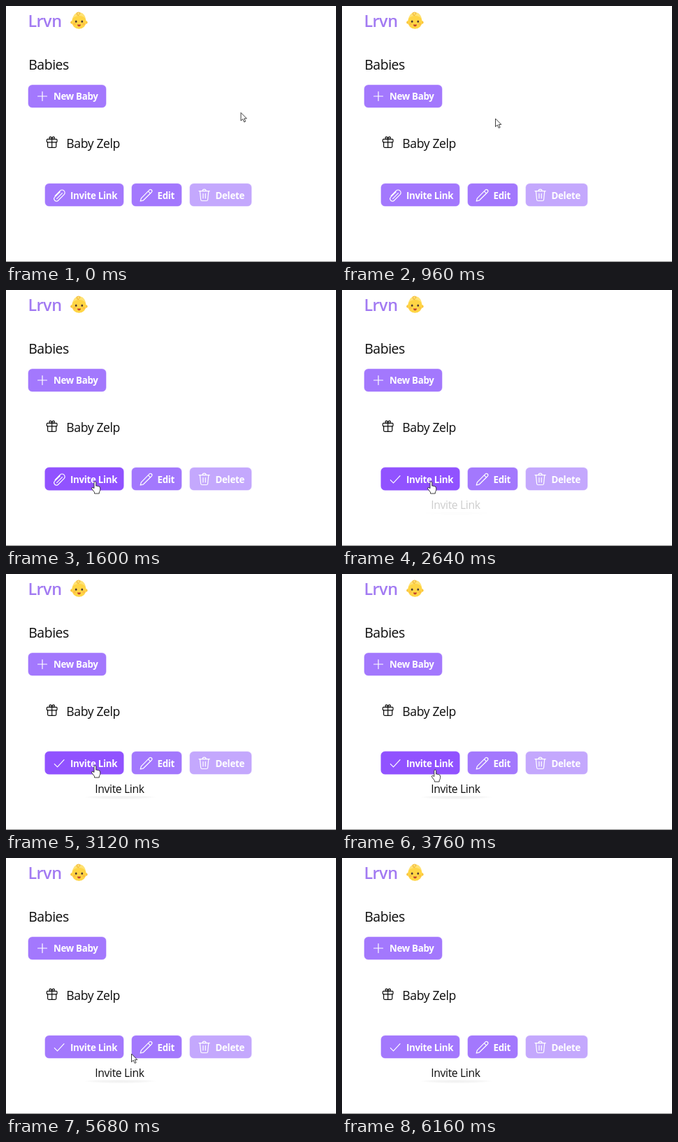
An HTML page that plays this animation: 472 px wide and 366 px high, repeating every 6.72 s.

```html
<!DOCTYPE html>
<html lang="en">
<head>
<meta charset="utf-8">
<title>Babies</title>
<style>
  html, body { margin: 0; width: 100%; height: 100%; overflow: hidden; background: #fff; }
  svg { display: block; width: 472px; height: 366px; }
  text { font-family: "Open Sans", "Noto Sans", sans-serif; letter-spacing: -.022em; fill: #0c0c0c; }
  .btn { fill: #a378fd; stroke: #a378fd; stroke-width: .6; }
  .pressed { fill: #9152ff; stroke: #9152ff; }
  .off { fill: #c4a8fd; stroke: #c4a8fd; }
  .label { font-size: 13.3px; font-weight: 700; fill: #fff; }
  .icon { fill: none; stroke: #fff; stroke-width: 1.2; stroke-linecap: round; stroke-linejoin: round; }
  .dark { stroke: #0c0c0c; }
  .pointer { fill: #fff; stroke: #2b2b2b; stroke-width: .9; stroke-linejoin: round; }
</style>
</head>
<body>
<svg viewBox="0 0 472 366">
  <defs>
    <radialGradient id="shade">
      <stop offset="0" stop-color="#000" stop-opacity=".06"/>
      <stop offset=".7" stop-color="#000" stop-opacity=".035"/>
      <stop offset="1" stop-color="#000" stop-opacity="0"/>
    </radialGradient>
  </defs>

  <text x="31.4" y="29.8" font-size="23.4" font-weight="600" style="fill:#a27af2">Lrvn</text>

  <!-- baby face -->
  <g>
    <circle cx="94.4" cy="23.4" r="2.2" fill="#f9c23a"/>
    <circle cx="114.4" cy="23.4" r="2.2" fill="#f9c23a"/>
    <circle cx="104.4" cy="22.4" r="10.4" fill="#ffd545"/>
    <path d="M95 18C97 11 101 9 104 9c6 0 9 4 10 9-3-3-6-4-9-4-4 0-7 1-10 4Z" fill="#ffe273"/>
    <path d="M104 13.6c-3.6-1-3.6-4.6 0-4.6 2.6 0 2.6 3 0 3" fill="none" stroke="#f2b93c" stroke-width="1.1" stroke-linecap="round"/>
    <ellipse cx="100.2" cy="22.2" rx="1.3" ry="1.6" fill="#4b3433"/>
    <ellipse cx="108.8" cy="22.2" rx="1.3" ry="1.6" fill="#4b3433"/>
    <circle cx="97.8" cy="25.8" r="1.7" fill="#ffb04a" opacity=".7"/>
    <circle cx="111.2" cy="25.8" r="1.7" fill="#ffb04a" opacity=".7"/>
    <path d="M101.8 26.4H107.2Q106.6 29.2 104.5 29.2T101.8 26.4Z" fill="#c0432f"/>
  </g>

  <text x="32.2" y="91" font-size="19.4">Babies</text>

  <rect class="btn" x="32" y="113" width="111" height="32" rx="5.5"/>
  <path class="icon" d="M45.5 129H58.5M52 122.5V135.5"/>
  <text class="label" x="68" y="133.7">New Baby</text>

  <g class="icon dark">
    <rect x="58.4" y="190.4" width="14.6" height="4.4" rx="1"/>
    <path d="M59.6 194.8V200.8a1.5 1.5 0 0 0 1.5 1.5H70.3A1.5 1.5 0 0 0 71.8 200.8V194.8M65.7 190.4V202.3M65.7 190.4C61.3 190.5 61.2 187.2 63.4 187.2 65 187.2 65.7 189 65.7 190.4 65.7 189 66.4 187.2 68 187.2 70.2 187.2 70.1 190.5 65.7 190.4"/>
  </g>
  <text x="86.3" y="203" font-size="17.6">Baby Zelp</text>

  <rect class="btn" x="56" y="254" width="112" height="32" rx="5.5"/>
  <rect id="hover" class="btn pressed" x="56" y="254" width="112" height="32" rx="5.5" opacity="0"/>
  <path id="clip" class="icon" d="M70.2 271.5L77.4 264.2A3.9 3.9 0 0 1 83 269.7L74.7 278A3.4 3.4 0 0 1 69.8 278 3.4 3.4 0 0 1 69.8 273.2L77.2 265.8M72.6 275.6L80.4 267.7"/>
  <path id="check" class="icon" d="M69.3 271.6L73.5 275.8 83 265.6" opacity="0"/>
  <text class="label" x="92" y="275.7">Invite Link</text>

  <rect class="btn" x="180" y="254" width="71" height="32" rx="5.5"/>
  <path class="icon" d="M192.2 279L193.4 274.8 205 263.1A2.1 2.1 0 0 1 208.2 266.2L196.5 277.8ZM203.4 264.8L206.5 267.9"/>
  <text class="label" x="216.5" y="275.7">Edit</text>

  <rect class="btn off" x="263" y="254" width="88" height="32" rx="5.5"/>
  <path class="icon" d="M276 264.6H291.2M281.1 264.6A2.5 2.5 0 0 1 286.1 264.6M277.4 264.6L278.6 276.7A2 2 0 0 0 280.6 278.5H286.6A2 2 0 0 0 288.6 276.7L289.8 264.6M281.9 268.3V274.8M285.3 268.3V274.8"/>
  <text class="label" x="299.5" y="275.7">Delete</text>

  <rect y="365" width="472" height="1" fill="#8c8c8c"/>

  <g id="tip" opacity="0">
    <ellipse cx="163.5" cy="319" rx="52" ry="3.2" fill="url(#shade)"/>
    <rect x="115" y="299" width="98" height="18.5" fill="#fff"/>
    <text x="127.2" y="312.5" font-size="15.7">Invite Link</text>
  </g>

  <path id="arrow" class="pointer" d="M0 0V11.6L2.7 9.1 4.7 13.4 6.6 12.5 4.7 8.4H8.3Z"/>
  <path id="hand" class="pointer" d="M-1.5 9.5V1.4a1.4 1.4 0 0 1 2.8 0V6.2Q2.7 5.2 3.5 6.6 5 5.8 5.5 7.3 7.2 6.9 7.2 8.8V11.4Q7 14 5.8 15V17H-1V15.2L-4.8 10.2Q-5.4 8.4-3.6 8.2Z"/>
</svg>
<script>
const LOOP = 6720, STEP = 80;
const $ = id => document.getElementById(id);
const parts = Object.fromEntries(
  ["hover", "clip", "check", "tip", "arrow", "hand"].map(id => [id, $(id)]));

// Pointer path: time, x, y
const path = [
  [480, 336, 152.5], [640, 314, 151], [800, 268, 152], [960, 219.5, 161],
  [1120, 166, 204], [1200, 149, 228], [1360, 133, 260], [1600, 127.5, 274],
  [3680, 127.5, 274], [3920, 145, 292], [4160, 161.5, 310],
  [5600, 161.5, 310], [5680, 179.5, 280], [5840, 252, 182], [6080, 368, 5]
];

// Level tables: time, value
const levels = {
  hover: [[1280, 0], [1440, 1], [3840, 1], [4000, 0]],
  check: [[1920, 0], [2160, 1]],
  tip: [[2560, 0], [2960, 1]]
};

function sample(table, t) {
  const next = table.findIndex(k => k[0] > t);
  if (next === 0) return table[0].slice(1);
  if (next < 0) return table[table.length - 1].slice(1);
  const a = table[next - 1], b = table[next];
  const f = (t - a[0]) / (b[0] - a[0]);
  return a.slice(1).map((v, i) => v + (b[i + 1] - v) * f);
}

const fade = (id, value) => parts[id].setAttribute("opacity", value);

function draw(time) {
  const t = Math.floor((time % LOOP) / STEP) * STEP;
  for (const id in levels) fade(id, sample(levels[id], t)[0]);
  fade("clip", 1 - sample(levels.check, t)[0]);

  const [x, y] = sample(path, t);
  const isHand = t >= 1360 && t < 5680;
  for (const id of ["arrow", "hand"]) {
    parts[id].setAttribute("transform", `translate(${x} ${y})`);
    fade(id, t < 6160 && (id === "hand") === isHand ? 1 : 0);
  }
}

const start = performance.now();
function tick() {
  draw(performance.now() - start);
  requestAnimationFrame(tick);
}
tick();
</script>
</body>
</html>
```
